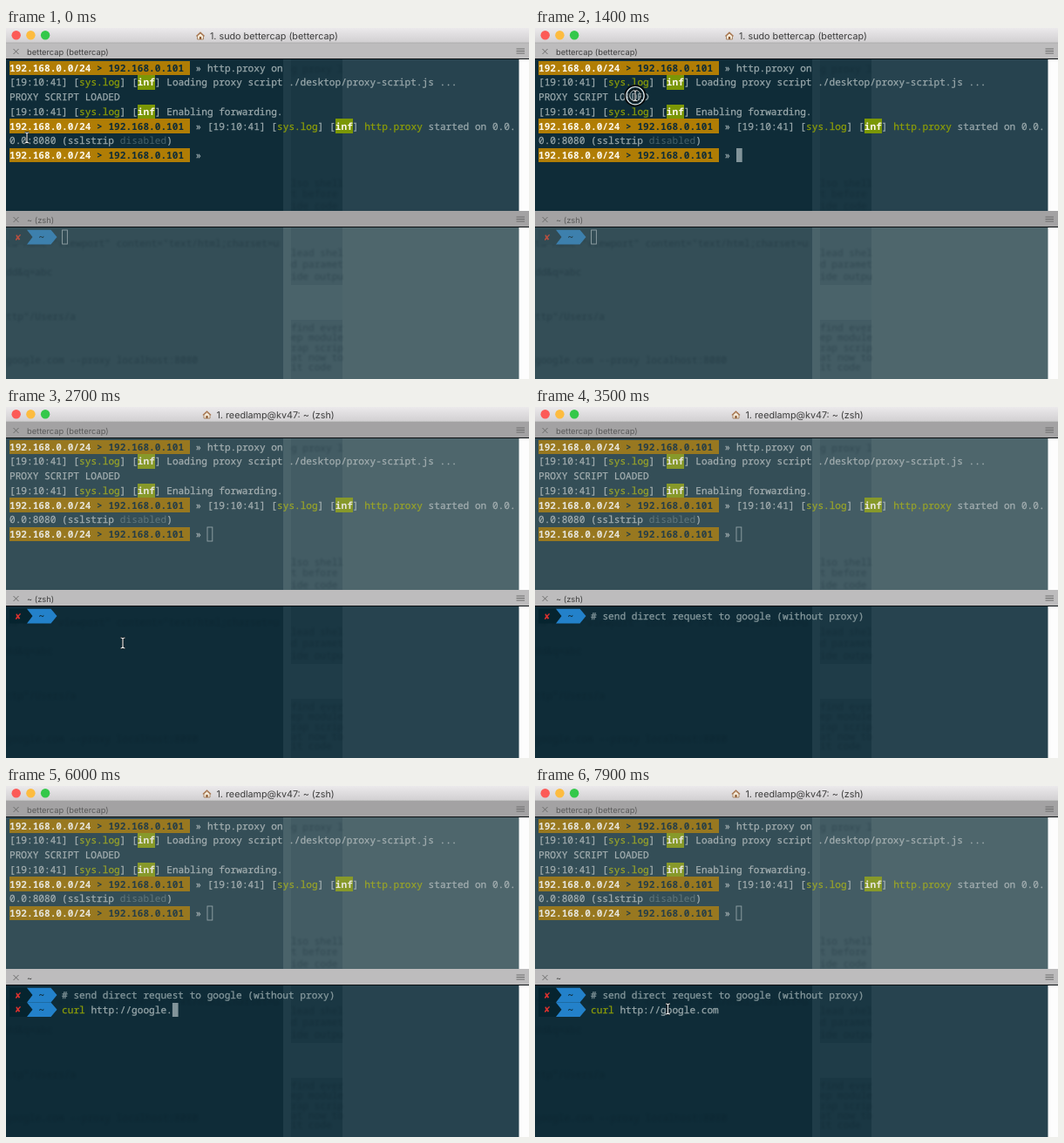
An HTML page that plays this animation: 600x403 px, repeating every 8 s.

```html
<!DOCTYPE html>
<html lang="en">
<head>
<meta charset="utf-8">
<title>Terminal session</title>
<style>
html, body { margin: 0; width: 100%; height: 100%; overflow: hidden; background: #0d2c38; }
svg { display: block; width: 600px; height: 403px; }
text { white-space: pre; text-rendering: geometricPrecision; }
.mono { font: 500 11.125px "Noto Sans Mono", "DejaVu Sans Mono", monospace; }
.ui { font-family: Inter, "Open Sans", sans-serif; fill: #3c3c3c; }
.title { font-size: 10.75px; }
.tab { font-size: 9.3px; }

.pane {
  --left: #0f2c38; --mid: #1a3743; --glow: #1f3c48; --right: #27434f; --bar: #bdbcbd;
  --fg: #9aa9ac; --soft: #879a9e; --green: #8d9e08; --badge: #7b9706;
  --gold: #b07d05; --bright: #fbf8ec; --ink: #0e2c38; --faint: #46626b;
  --blue: #2381ca; --seg: #06242f; --red: #dc322f; --ghost: .26; --label: #3f3f3f;
}
.pane.dim {
  --left: #344e57; --mid: #435c64; --glow: #4a636a; --right: #4e666c; --bar: #a3a2a3;
  --fg: #a3aeb0; --soft: #9ba9ab; --green: #98a329; --badge: #87992a;
  --gold: #987820; --bright: #e6e5dc; --ink: #263e47; --faint: #61777d;
  --blue: #3d80ad; --seg: #314b54; --red: #b94f3f; --ghost: .28; --label: #5a5a5a;
}
.left { fill: var(--left); } .mid { fill: var(--mid); } .glow { fill: var(--glow); }
.right { fill: var(--right); } .track { fill: #fdfdfd; }
.bar { fill: var(--bar); } .pane .tab { fill: var(--label); }
.fg { fill: var(--fg); stroke: var(--fg); }
.soft { fill: var(--soft); stroke: var(--soft); }
.green { fill: var(--green); stroke: var(--green); }
.fg, .soft, .green { stroke-width: .25; }
.faint { fill: var(--faint); }
.ink { fill: var(--ink); font-weight: 700; }
.bright { fill: var(--bright); font-weight: 700; }
.gold { fill: var(--gold); } .badge { fill: var(--badge); }
.gold, .badge { shape-rendering: crispEdges; }
.blue { fill: var(--blue); } .seg { fill: var(--seg); }
.red { fill: var(--red); font: 9.6px "DejaVu Sans", sans-serif; }
.ghost { fill: #061a24; opacity: var(--ghost); filter: blur(1.1px); }
.caret { fill: #82949a; width: 6.7px; height: 16px; }
.dim .caret { fill: none; stroke: #93a3a7; stroke-width: .9; width: 5.8px; }
.icon { stroke: #6c6c6c; fill: none; }
</style>
</head>
<body>
<svg id="stage" viewBox="0 0 600 403" xmlns="http://www.w3.org/2000/svg"></svg>
<script>
const LOOP = 8000, STEP = 100, COL = 6.675, ROW = 16.68;
const COMMENT = '# send direct request to google (without proxy)';
const BEAM = 'M-2.4 -6Q0 -6 0 -4.3V4.3Q0 6 -2.4 6M2.4 -6Q0 -6 0 -4.3M0 4.3Q0 6 2.4 6';
const stage = document.getElementById('stage');

const x = col => 4 + col * COL;
const rect = (cls, left, top, w, h) =>
  `<rect class="${cls}" x="${left}" y="${top}" width="${w}" height="${h}"/>`;
const text = (cls, left, base, str, id = '') =>
  `<text class="${cls}" x="${left}" y="${base}"${id && ` id="${id}"`}>${str.replace(/&/g, '&amp;').replace(/</g, '&lt;')}</text>`;

// Lays out [class, string, background] runs one after another on a row.
function line(top, ...runs) {
  let col = 0, out = '';
  for (const [cls, str, back] of runs) {
    if (back) out += rect(back, x(col), top, str.length * COL, ROW);
    out += text('mono ' + cls, x(col), top + 12.2, str);
    col += str.length;
  }
  return out;
}

const host = [['bright', '192.168.0.0/24', 'gold'], ['ink', ' > 192.168.0.101 ', 'gold']];
const log = [['fg', '[19:10:41] ['], ['green', 'sys.log'], ['fg', '] ['], ['bright', 'inf', 'badge'], ['fg', '] ']];

function proxyLog() {
  const rows = [
    [...host, ['fg', ' » http.proxy on']],
    [...log, ['fg', 'Loading proxy script ./desktop/proxy-script.js ...']],
    [['fg', 'PROXY SCRIPT LOADED']],
    [...log, ['fg', 'Enabling forwarding.']],
    [...host, ['fg', ' » '], ...log, ['green', 'http.proxy'], ['fg', ' started on 0.0.']],
    [['fg', '0.0:8080 (sslstrip '], ['faint', 'disabled'], ['fg', ')']],
    [...host, ['fg', ' » ']]
  ];
  return rows.map((runs, i) => line(37.6 + i * ROW, ...runs)).join('');
}

function shellPrompt(top) {
  const mid = top + ROW / 2, end = top + ROW;
  return `<path class="seg" d="M4 ${top}H24L30.5 ${mid}L24 ${end}H4Z"/>` +
    `<path class="blue" d="M24 ${top}H51.5L58.5 ${mid}L51.5 ${end}H24L30.5 ${mid}Z"/>` +
    text('red', 9.8, top + 11.8, '✘') + text('mono ink', x(5), top + 12.2, '~');
}

function backdrop(top, bottom) {
  const h = bottom - top;
  return rect('left', 0, top, 320, h) + rect('mid', 318, top, 70, h) +
    rect('glow', 318, top, 9, h) + rect('right', 386, top, 203, h) +
    rect('track', 588.5, top, 12, h);
}

// Blurred lines that shine through from a window behind.
const ghosts = (left, list) =>
  list.map(([base, str]) => text('mono ghost', left, base, str)).join('');

function tabBar(top, label, id) {
  const y = 18 + top - 8.5;
  return rect('bar', 0, top, 600, 19) +
    `<path class="icon" d="M8.5 ${y - 2.5}l6 6m0 -6l-6 6"/>` +
    `<path class="icon" d="M585.5 ${y - 2.5}h9.5m-9.5 2.5h9.5m-9.5 2.5h9.5"/>` +
    text('ui tab', 24, y + 4, label, id) +
    `<path d="M0 ${top + 18.5}H600" stroke="#0a0f12"/>`;
}

const lights = ['#fc5b57', '#fdbc40', '#34c84a'].map((c, i) =>
  `<circle cx="${11.7 + i * 16.7}" cy="8.3" r="5.2" fill="${c}"/>`).join('');

stage.innerHTML = `
<defs><linearGradient id="chrome" x2="0" y2="1">
  <stop stop-color="#ebe9eb"/><stop offset="1" stop-color="#d1cfd1"/>
</linearGradient></defs>
<g id="upper" class="pane">
  ${backdrop(35, 210)}
  ${ghosts(327, [[51, 'g proxy l'], [182, 'lso shell'], [194, 't before '], [208, 'ide code ']])}
  ${proxyLog()}
  <rect id="upperCaret" class="caret" x="231" y="138"/>
  ${tabBar(17, 'bettercap (bettercap)', 'upperTab')}
</g>
<g id="lower" class="pane">
  ${backdrop(229, 403)}
  ${rect('glow', 318, 295, 68, 40)}
  ${ghosts(0, [
    [251, 'ta name="viewport" content="text/html;charset=u'], [284, 'dd&q=abc'],
    [335, 'ttp"/Users/a'], [385, 'google.com --proxy localhost:8080']
  ])}
  ${ghosts(327, [
    [262, 'lead shel'], [275, 'd paramet'], [289, 'ide outpu'], [348, 'find ever'],
    [359, 'ep module'], [371, 'rap scrip'], [382, 'at now to'], [393, 'it code']
  ])}
  ${shellPrompt(231.7)}
  ${text('mono soft', x(9), 243.9, '', 'note')}
  <g id="second">${shellPrompt(231.7 + ROW)}</g>
  <rect id="lowerCaret" class="caret"/>
  ${text('mono green', x(9), 260.6, '', 'command')}
  ${text('mono fg', x(14), 260.6, '', 'address')}
  ${tabBar(210, '', 'lowerTab')}
</g>
<rect width="600" height="17" fill="url(#chrome)"/>
<path d="M0 17H600" stroke="#a5a4a5" stroke-width=".7"/>
${lights}
<g id="heading">
  <path d="M-3.5 0V4H3.5V0L0 -3Z" fill="#f4ead9" stroke="#9a7350" stroke-width=".8"/>
  <path d="M-4.6 .4L0 -3.9L4.6 .4" fill="none" stroke="#a8744c" stroke-width="1.3"/>
  <rect x="-1.1" y="1" width="2.2" height="3" fill="#8d5a33"/>
  ${text('ui title', 11, 3.5, '', 'title')}
</g>
<g id="mouse" fill="none">
  <g id="ring">
    <circle r="11.6" stroke="#05090b" stroke-width="2"/>
    <circle r="10.2" stroke="#e4e9ea" stroke-width="1.1"/>
    <circle r="7.6" stroke="#0a1114" stroke-width="1.4"/>
    <circle r="6.2" stroke="#b9c3c5" stroke-width=".9"/>
  </g>
  <path d="${BEAM}" stroke="#0a1114" stroke-width="2.4"/>
  <path d="${BEAM}" stroke="#f2f5f5" stroke-width="1.1"/>
</g>`;

const el = id => document.getElementById(id);
const show = (id, on) => { el(id).style.display = on ? '' : 'none'; };
const put = (id, str) => { if (el(id).textContent !== str) el(id).textContent = str; };
const typed = (str, t, from) => str.slice(0, Math.max(0, Math.floor((t - from) / STEP) + 1));

// Pointer stops as [time, x, y], eased in between.
const path = [[0, 24, 126], [200, 24, 126], [1200, 115, 77.7], [1700, 115, 77.7], [2500, 134, 271], [7300, 134, 271], [7800, 152.5, 256], [8000, 152.5, 256]];

function pointer(t) {
  const i = path.findIndex(p => p[0] > t);
  const [t0, x0, y0] = path[i - 1], [t1, x1, y1] = path[i];
  const k = (t - t0) / (t1 - t0), e = k * k * (3 - 2 * k);
  return [x0 + (x1 - x0) * e, y0 + (y1 - y0) * e];
}

function draw(t) {
  const inShell = t >= 2700, entered = t >= 3700;
  el('upper').classList.toggle('dim', inShell);
  el('lower').classList.toggle('dim', !inShell);
  put('title', inShell ? '1. reedlamp@kv47: ~ (zsh)' : '1. sudo bettercap (bettercap)');
  el('heading').setAttribute('transform', `translate(${inShell ? 230.5 : 223} 9)`);
  put('lowerTab', entered ? '~' : '~ (zsh)');

  const note = t >= 3200 ? COMMENT : '';
  const input = typed('curl ', t, 3900) + typed('http://google.', t, 4700) + typed('com', t, 6200);
  put('note', note);
  put('command', input.slice(0, 5));
  put('address', input.slice(5));
  show('second', entered);

  const caret = el('lowerCaret');
  caret.setAttribute('x', x(9 + (entered ? input : note).length) + (inShell ? 0 : .5));
  caret.setAttribute('y', entered ? 249 : 232);
  show('upperCaret', inShell || (t % 1000 >= 300 && t % 1000 < 800));
  show('lowerCaret', !inShell || t % 1000 < 500);

  show('mouse', t < 3200 || t >= 7300);
  show('ring', t >= 1300 && t < 1600);
  el('mouse').setAttribute('transform', `translate(${pointer(t).join(' ')})`);
}

const start = performance.now();
function tick() {
  const t = (performance.now() - start) % LOOP;
  draw(Math.floor(t / STEP) * STEP);
  requestAnimationFrame(tick);
}
tick();
</script>
</body>
</html>
```
